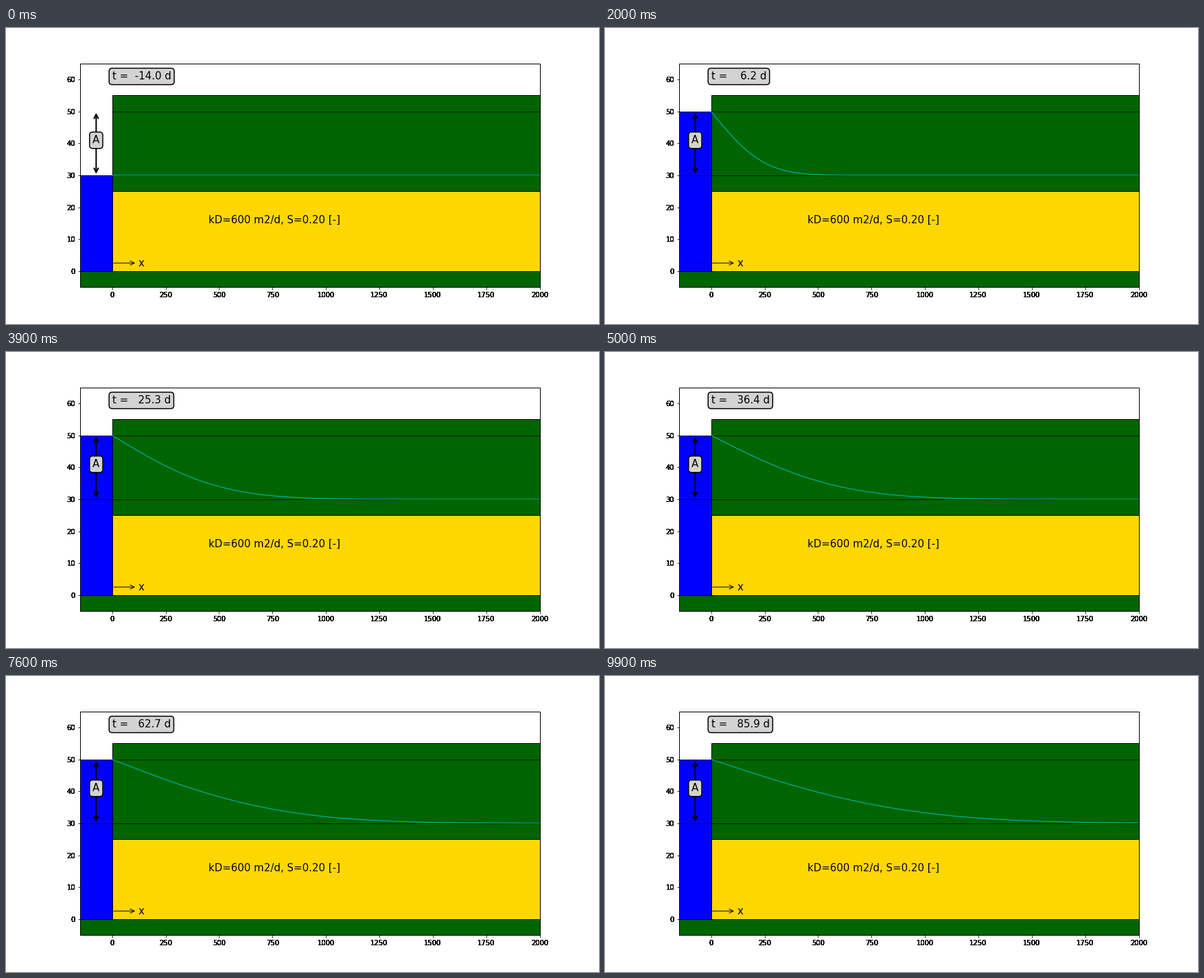
A matplotlib script that plays this animation: 864x432 px, repeating every 10 s.

```python
import math

import matplotlib.pyplot as plt
import numpy as np
from matplotlib.animation import FuncAnimation
from matplotlib.patches import Rectangle

plt.rcParams.update({"font.family": "DejaVu Sans", "font.size": 10,
                     "axes.linewidth": 1})

FRAMES, INTERVAL = 100, 100
T0, DT = -14.0, 1.00895          # days
KD, S = 600, 0.20
H0, A = 30, 20
LEFT, LENGTH = -150, 2000
SIZE = 15

fig = plt.figure(figsize=(12, 6), dpi=72, facecolor="white")
ax = fig.add_axes([0.125, 0.125, 0.775, 0.755])
ax.set(xlim=(LEFT, LENGTH), ylim=(-5, 65))


def block(x, y, w, h, color):
    return ax.add_patch(Rectangle((x, y), w, h, fc=color, ec="black", lw=1))


def heavy_labels(axis, ticks, copies=8):
    """Tick labels drawn several times over, which hardens their edges."""
    axis.set_ticks(ticks, labels=[""] * len(ticks))
    is_x = axis is ax.xaxis
    place = ax.get_xaxis_text1_transform if is_x else ax.get_yaxis_text1_transform
    trans, va, ha = place(7)
    for v in ticks:
        pos = (v, 0) if is_x else (0, v)
        for _ in range(copies):
            ax.text(*pos, str(v), transform=trans, va=va, ha=ha)


heavy_labels(ax.xaxis, range(0, 2001, 250))
heavy_labels(ax.yaxis, range(0, 61, 10))

block(0, 25, LENGTH, 30, "darkgreen")
block(0, 0, LENGTH, 25, "gold")
block(LEFT, -5, LENGTH - LEFT, 5, "darkgreen")
water = block(LEFT, 0, -LEFT, H0, "blue")

ax.plot([0, LENGTH], [H0 + A, H0 + A], color="black", lw=0.8)
ax.plot([LEFT, LENGTH], [H0, H0], color="black", lw=0.8)
x = np.linspace(0, LENGTH, 201)
head, = ax.plot(x, np.full_like(x, H0), color="#00bfbf", lw=1, snap=False)

box = dict(boxstyle="round,pad=0.3", fc="lightgray", ec="black", lw=1.5)
ax.annotate("", xy=(LEFT / 2, H0), xytext=(LEFT / 2, H0 + A), size=SIZE,
            arrowprops=dict(arrowstyle="<->", lw=2))
ax.text(LEFT / 2, 40, "A", size=SIZE, ha="center", bbox=box, zorder=5)
ax.annotate("x", xy=(0, 2.5), xytext=(120, 2.5), size=SIZE, va="center",
            arrowprops=dict(arrowstyle="<-"))
ax.text(450, 15, f"kD={KD} m2/d, S={S:.2f} [-]", size=SIZE)
clock = ax.text(0, 60, "", size=SIZE, bbox=box)


def update(i):
    t = T0 + i * DT
    clock.set_text(f"t = {t:6.1f} d")
    if t > 0:
        u = x * math.sqrt(S / (4 * KD * t))
        rise = A * np.array([math.erfc(v) for v in u])
    else:
        rise = np.zeros_like(x)
    head.set_ydata(H0 + rise)
    water.set_height(H0 + A if t > 0 else H0)
    return head, water, clock


anim = FuncAnimation(fig, update, frames=FRAMES, interval=INTERVAL,
                     repeat=True, repeat_delay=0)
plt.show()
```
